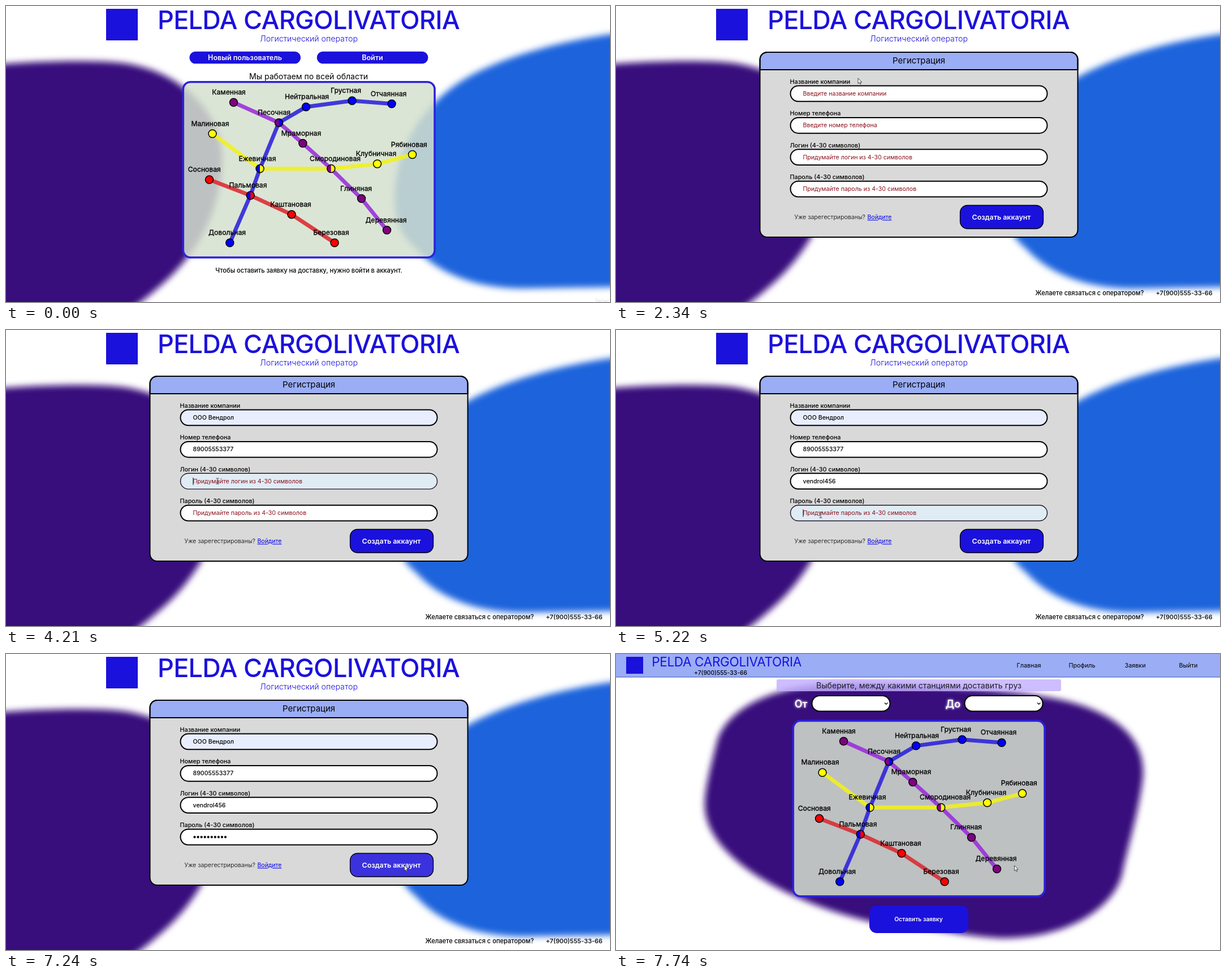
Animation, 1068 px wide and 525 px high, one loop 8000 ms. Source, as an HTML page:

```html
<!DOCTYPE html>
<html lang="ru">
<head>
<meta charset="utf-8">
<title>Логистический оператор</title>
<style>
html, body { margin: 0; width: 100%; height: 100%; overflow: hidden; background: #fff; }
svg { display: block; width: 1068px; height: 525px; }
text { font-family: Inter, Roboto, sans-serif; white-space: pre; }
.big { letter-spacing: -.015em; }
.glow { filter: drop-shadow(0 0 2px #fff); }
</style>
</head>
<body>
<svg id="stage" viewBox="0 0 1068 525" xmlns="http://www.w3.org/2000/svg"></svg>
<script>
const LOOP = 8000;
const BLUE = '#1b11dc', HOVER = '#3b32de', VIOLET = '#38097c';
const BRAND = 'PELDA CARGOLIVATORIA', PHONE = '+7(900)555-33-66';

const text = (x, y, size, str, o = {}) =>
  `<text x="${x}" y="${y}" font-size="${size}" font-weight="${o.w || 400}" fill="${o.fill || '#000'}"
    text-anchor="${o.mid ? 'middle' : 'start'}" class="${o.cls || ''}" ${o.more || ''}>${str}</text>`;
const rect = (x, y, w, h, r, fill, more = '') =>
  `<rect x="${x}" y="${y}" width="${w}" height="${h}" rx="${r}" fill="${fill}" ${more}/>`;
const blob = (d, fill) => `<path d="${d}" fill="${fill}" filter="url(#soft)"/>`;

// Rail map: stations as name -> [x, y, label x, left colour, right colour]
const P = '#800080', B = '#0000ff', Y = '#ffff00', R = '#ff0000';
const stations = {
  'Каменная': [402.5, 171, 394, P], 'Песочная': [482.5, 207, 474, P, B],
  'Мраморная': [524.8, 243.5, 522, P], 'Смородиновая': [574.7, 288.5, 582, P, Y],
  'Глиняная': [628.5, 341.5, 619, P], 'Деревянная': [673.5, 397.5, 672, P],
  'Отчаянная': [682, 173.5, 676.5, B], 'Грустная': [612, 168, 601, B],
  'Нейтральная': [530.5, 179, 532, B], 'Ежевичная': [449, 288.5, 444.5, B, Y],
  'Пальмовая': [432.2, 336, 428, B, R], 'Довольная': [395.8, 420, 391, B],
  'Малиновая': [365, 226.5, 361, Y], 'Клубничная': [656.5, 280, 654.5, Y],
  'Рябиновая': [718.5, 263.5, 712.8, Y], 'Сосновая': [359.5, 308, 350.8, R],
  'Каштановая': [505, 369.7, 503.5, R], 'Березовая': [581, 420, 575, R]
};
const lines = [
  ['#9a2bdc', 'Каменная Песочная Мраморная Смородиновая Глиняная Деревянная'],
  ['#2a1fdc', 'Отчаянная Грустная Нейтральная Песочная Ежевичная Пальмовая Довольная'],
  ['#f2f21c', 'Малиновая Ежевичная Смородиновая Клубничная Рябиновая'],
  ['#dc2830', 'Сосновая Пальмовая Каштановая Березовая']
];
function railMap() {
  let s = rect(313.3, 134.8, 444.7, 311.2, 13, 'rgba(213,225,206,.85)', 'stroke="#2c22dc" stroke-width="3.5"');
  for (const [color, names] of lines) {
    const pts = names.split(' ').map(n => stations[n].slice(0, 2)).join(' ');
    s += `<polyline points="${pts}" fill="none" stroke="${color}" stroke-width="7" opacity=".87"/>`;
  }
  for (const [x, y, , left, right] of Object.values(stations)) {
    s += `<circle cx="${x}" cy="${y}" r="7" fill="${left}"/>`;
    if (right) s += `<path d="M${x} ${y - 7}a7 7 0 0 1 0 14z" fill="${right}"/>`;
    s += `<circle cx="${x}" cy="${y}" r="7" fill="none" stroke="#000" stroke-width="1.5"/>`;
  }
  for (const [name, [, y, lx]] of Object.entries(stations))
    s += text(lx, y - 13.8, 12.2, name, { mid: 1, more: 'stroke="#000" stroke-width=".3"' });
  return s;
}

const banner = rect(177, 5, 56, 56, 0, BLUE) +
  text(535, 41, 45, BRAND, { mid: 1, w: 500, fill: BLUE, cls: 'big' }) +
  text(535.5, 63, 14.2, 'Логистический оператор', { mid: 1, w: 350, fill: BLUE });

const backdrop =
  blob('M-40 106C40 98 150 95 205 101C305 113 382 187 382 270C382 330 360 395 325 440C300 475 265 505 225 535L200 570H-40Z', VIOLET) +
  blob('M1110 45C1000 56 885 87 815 127C740 171 687 250 687 340C687 385 700 410 725 430C765 475 830 500 910 501L1110 498Z', '#1e63dc');

const home = backdrop + banner +
  rect(325.2, 81.4, 195, 20.2, 10.1, BLUE, `id="join" stroke="${BLUE}" stroke-width="1.5"`) +
  rect(549.8, 80.7, 196.5, 21.6, 10.8, BLUE) +
  text(422.5, 96, 12.5, 'Новый пользователь', { mid: 1, w: 600, fill: '#fff' }) +
  text(648, 96, 12.5, 'Войти', { mid: 1, w: 600, fill: '#fff' }) +
  text(535, 129.5, 14, 'Мы работаем по всей области', { mid: 1 }) + railMap() +
  text(535.5, 472.7, 11.1, 'Чтобы оставить заявку на доставку, нужно войти в аккаунт.', { mid: 1, w: 500 }) +
  `<g id="note">${text(1041, 526, 9, 'Запись', { fill: '#ddd' })}</g>`;

const fields = [
  ['Название компании', 'Введите название компании'],
  ['Номер телефона', 'Введите номер телефона'],
  ['Логин (4-30 символов)', 'Придумайте логин из 4-30 символов'],
  ['Пароль (4-30 символов)', 'Придумайте пароль из 4-30 символов']
];
const fieldY = i => 141.5 + i * 56.4;
const dots = Array.from({ length: 10 }, (_, i) =>
  `<circle class="dot" cx="${333.5 + i * 6.05}" cy="324.7" r="2.1"/>`).join('');

const form = backdrop + banner +
  rect(254.5, 82, 562, 328, 13, '#d9d9d9') +
  '<path d="M254.5 113V95a13 13 0 0 1 13-13H803.5a13 13 0 0 1 13 13V113Z" fill="#9aadf5" stroke="#000" stroke-width="2"/>' +
  rect(254.5, 82, 562, 328, 13, 'none', 'stroke="#000" stroke-width="2"') +
  text(535.5, 101.8, 14.9, 'Регистрация', { mid: 1 }) +
  fields.map(([label], i) =>
    text(307.5, fieldY(i) - 3.5, 10.8, label, { w: 500 }) +
    rect(308.5, fieldY(i), 454, 27.8, 13.9, '#fff', 'class="box" stroke="#000"') +
    text(330.5, fieldY(i) + 17.5, 10.6, '', { more: 'data-value' })).join('') + dots +
  '<path id="caret" stroke="#000"/>' +
  text(315.5, 378.3, 10.7, 'Уже зарегестрированы?', { w: 300 }) +
  text(444.5, 378.3, 10.5, 'Войдите', { fill: '#0000ee', more: 'text-decoration="underline"' }) +
  rect(608.5, 353.5, 147, 41.5, 13, BLUE, 'id="create" stroke="#000" stroke-width="1.3"') +
  text(681.5, 379.3, 12.4, 'Создать аккаунт', { mid: 1, w: 600, fill: '#fff' }) +
  text(741.5, 513.3, 11.1, 'Желаете связаться с оператором?', { w: 500 }) +
  text(954.5, 513.3, 11, PHONE, { w: 500 });

const load = banner + text(535.5, 137, 36, 'Загрузка...', { mid: 1, cls: 'big' }) +
  `<g id="status"><path d="M0 511.5H353a2 2 0 0 1 2 2V525H0Z" fill="#202226"/>
   <text x="0" y="522" font-size="8" fill="#fff" style="font-family:'Open Sans',sans-serif">Ожидание localhost...</text></g>`;

const select = x => rect(x, 74, 138, 27.5, 13.5, '#fff', 'stroke="#000" stroke-width="2"') +
  `<path d="M${x + 128.5} 86.5l2.7 2.7 2.7-2.7" fill="none" stroke="#000" stroke-width="1.3"/>`;
const menu = [['Главная', 730], ['Профиль', 824], ['Заявки', 918], ['Выйти', 1012]];

const app =
  blob('M180 150C205 85 300 50 420 52C560 55 700 62 790 82C890 105 940 155 931 225C922 290 905 340 895 390C880 450 800 505 680 504C600 500 540 480 465 478C330 450 160 370 157 270C156 240 170 190 180 150Z', VIOLET) +
  rect(0, 0, 1068, 41, 0, '#9aadf5') + rect(0, 40.5, 1068, 1, 0, '#3f55b4') +
  rect(18, 5, 30, 30, 0, BLUE) +
  text(195.5, 21.5, 22.5, BRAND, { mid: 1, fill: BLUE, cls: 'big' }) +
  text(185, 36.7, 10.3, PHONE, { mid: 1, w: 500 }) +
  menu.map(([s, x]) => text(x, 23.8, 10.8, s, { mid: 1 })).join('') +
  rect(284, 45, 503, 21, 3, 'rgba(196,176,255,.82)') +
  text(535.5, 61, 14.1, 'Выберите, между какими станциями доставить груз', { mid: 1, fill: '#1c1c24' }) +
  text(327, 94.5, 18, 'От', { mid: 1, w: 600, fill: '#fff', cls: 'glow' }) +
  text(596, 94.5, 18, 'До', { mid: 1, w: 600, fill: '#fff', cls: 'glow' }) +
  select(346.5) + select(616.5) +
  `<g transform="translate(0 -16.2)">${railMap()}</g>` +
  rect(448, 446, 175, 49, 13, BLUE) +
  text(535, 474, 10.3, 'Оставить заявку', { mid: 1, w: 600, fill: '#fff' });

const pages = { home, form, load, app };
const stage = document.getElementById('stage');
stage.innerHTML =
  '<defs><filter id="soft" x="-10%" y="-10%" width="120%" height="120%"><feGaussianBlur stdDeviation="6"/></filter></defs>' +
  Object.entries(pages).map(([id, s]) => `<g id="${id}">${s}</g>`).join('') +
  `<g id="cursor"><path id="arrow" d="M0 0V9.6L2.2 7.6 3.7 10.8 5.1 10.2 3.7 7.1H6.6Z" fill="#fff" stroke="#222" stroke-width=".8"/>
   <path id="beam" d="M-2.5-5H-.6L0-4.5.6-5H2.5M0-4.5V4.5M-2.5 5H-.6L0 4.5.6 5H2.5" fill="none" stroke="#333" stroke-width=".9"/></g>`;

// Tracks: [time, value], each value holds until the next
const tracks = {
  page: [[0, 'home'], [1840, 'form'], [7410, 'load'], [7740, 'app']],
  focus: [[0, -1], [3190, 0], [3360, 1], [4040, 2], [5220, 3], [6740, -1]],
  caret: [[0, 0], [3190, 1], [3530, 0], [4040, 1], [4880, 0], [5220, 1], [6230, 0]],
  company: [[0, ''], [3360, 'ООО Вендрол']],
  phone: [[0, ''], [3360, '89005'], [3530, '89005553377']],
  login: [[0, ''], [4540, 'vend'], [4710, 'vendrol456']],
  dots: [[0, 0], [5550, 2], [5720, 5], [5890, 8], [6060, 10]]
};
// Pointer: time, x, y, 1 = text beam
const pointer = [
  [170, 980, 470, 0], [330, 820, 345, 0], [500, 660, 225, 0], [670, 540, 140, 0],
  [830, 480, 106, 0], [1000, 460, 99, 0], [1160, 453, 93, 0],
  [2170, 445, 105, 0], [2340, 428, 128, 0], [2500, 412, 147, 1], [2670, 403, 157, 1],
  [3190, 403, 157, 1], [3360, 390, 200, 1], [3530, 384, 224, 1],
  [3700, 380, 245, 0], [3870, 376, 262, 1], [4040, 374, 268, 1],
  [4880, 368, 379, 1], [5050, 363, 340, 0], [5220, 362, 328, 1],
  [6230, 480, 345, 0], [6400, 610, 364, 0], [6570, 695, 373, 0], [6740, 704.5, 375, 0]
];
const last = (rows, t) => rows.filter(r => r[0] <= t).pop();
const at = (name, t) => last(tracks[name], t)[1];

const $ = id => document.getElementById(id);
const show = (el, on) => el.style.display = on ? '' : 'none';
const boxes = [...stage.querySelectorAll('.box')];
const values = [...stage.querySelectorAll('[data-value]')];
const dotEls = [...stage.querySelectorAll('.dot')];

function drawForm(t) {
  const focus = at('focus', t), count = at('dots', t);
  const typed = [at('company', t), at('phone', t), at('login', t), ''];
  boxes.forEach((box, i) => {
    const on = i === focus;
    box.setAttribute('fill', on ? '#e0ecf4' : i === 0 && typed[0] ? '#e8eefe' : '#fff');
    box.setAttribute('stroke', on ? '#21142e' : '#000');
    box.setAttribute('stroke-width', on ? 1.4 : 2);
    const hint = !typed[i] && !(i === 3 && count);
    values[i].textContent = hint ? fields[i][1] : typed[i];
    values[i].setAttribute('fill', hint ? '#8b0f1a' : '#000');
    values[i].setAttribute('font-weight', hint ? 400 : 500);
  });
  dotEls.forEach((d, i) => show(d, i < count));
  const on = focus >= 0 && at('caret', t);
  show($('caret'), on);
  if (on) {
    const w = focus === 3 ? count * 6.05 : typed[focus] ? values[focus].getComputedTextLength() : 0;
    $('caret').setAttribute('d', `M${331 + w} ${fieldY(focus) + 7.5}v13`);
  }
  $('create').setAttribute('fill', t >= 6570 ? HOVER : BLUE);
}

function draw(t) {
  const page = at('page', t);
  for (const id in pages) show($(id), id === page);
  show($('note'), t < 170);
  $('join').setAttribute('fill', t >= 1000 ? HOVER : BLUE);
  show($('status'), t < 7580);
  if (page === 'form') drawForm(t);
  const p = last(pointer, t);
  show($('cursor'), p);
  if (p) {
    $('cursor').setAttribute('transform', `translate(${p[1]} ${p[2]})`);
    show($('arrow'), !p[3]);
    show($('beam'), p[3]);
  }
}

const start = performance.now();
function tick() {
  draw((performance.now() - start) % LOOP);
  requestAnimationFrame(tick);
}
draw(0);
requestAnimationFrame(tick);
</script>
</body>
</html>
```
